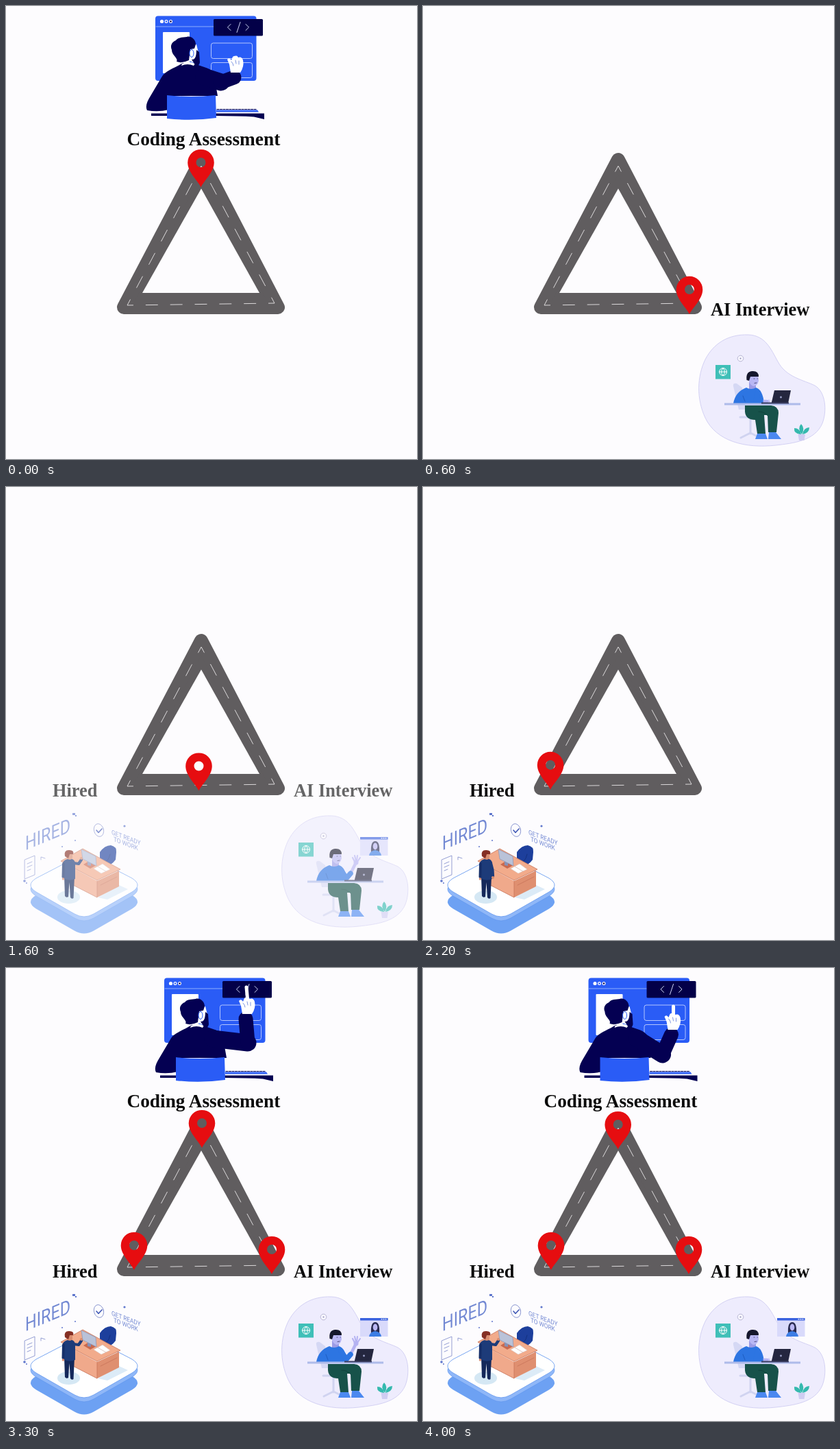
An HTML page that plays this animation: 600 px wide and 660 px high, repeating every 4100 ms.

```html
<!DOCTYPE html>
<html lang="en">
<head>
<meta charset="utf-8">
<title>Hiring road map</title>
<style>
  html, body { margin: 0; width: 100%; height: 100%; overflow: hidden; background: #fdfcfe; }
  svg { display: block; width: 600px; height: 660px; }
  .label { font: bold 26.4px "Liberation Serif", "Times New Roman", serif; fill: #0b0b0b; }
  .iso { font-family: Roboto, sans-serif; fill: #7389d3; }
  .line { fill: none; stroke-linecap: round; stroke-linejoin: round; }
</style>
</head>
<body>
<svg viewBox="0 0 600 660">
  <defs>
    <path id="slab" d="M100 541Q114 533 128 541L184 570Q200 580 184 590L128 622Q114 630 100 622L44 590Q28 580 44 570Z"/>
    <path id="pin" fill="#e60d10" fill-rule="evenodd"
      d="M0 0C-4-9-19.3-22-19.3-35.8A19.3 19.3 0 0 1 19.3-35.8C19.3-22 4-9 0 0ZM-7-36A7 7 0 0 0 7-36A7 7 0 0 0-7-36Z"/>
  </defs>

  <!-- road -->
  <path d="M285 224L397 439H172Z" fill="#605d5f" stroke="#605d5f" stroke-width="20" stroke-linejoin="round"/>
  <path d="M285 266L370 418H199Z" fill="#fdfcfe"/>
  <g class="line" stroke="#e9e7e8" stroke-width=".9" stroke-dasharray="2 2" stroke-dashoffset="1" style="stroke-linecap:butt">
    <path pathLength="24" d="M285 233L392 433"/>
    <path pathLength="24" d="M392 433L177 436"/>
    <path pathLength="24" d="M177 436L285 233"/>
  </g>

  <!-- coding assessment -->
  <g id="coding">
    <g id="coder">
      <rect x="218" y="14.500" width="147.500" height="94.500" rx="4" fill="#2a5cf6"/>
      <path class="line" stroke="#a9c0ff" stroke-width=".8" d="M219 30H365"/>
      <g stroke="#fff" stroke-width="1.200">
        <circle cx="227.500" cy="22.500" r="2" fill="#fff"/>
        <circle cx="234" cy="22.500" r="1.900" fill="#2a5cf6"/>
        <circle cx="240.500" cy="22.500" r="1.900" fill="#040052"/>
      </g>
      <rect x="229" y="38" width="39" height="60" rx="1" fill="#fff"/>
      <g fill="none" stroke="#c3d2ff" stroke-width=".9">
        <rect x="299.500" y="54" width="60" height="22.500" rx="3"/>
        <rect x="299.500" y="82.500" width="60" height="22" rx="3"/>
      </g>
      <rect x="303" y="19" width="72" height="24.500" rx="1.500" fill="#030048"/>
      <path class="line" stroke="#cfd6f5" stroke-width="1" d="M328 26.500L323.500 31L328 35.500M342 23.500L337 38.500M350 26.500L354.500 31L350 35.500"/>
      <path d="M307 151.500H367L369 154.500H307Z" fill="#2a5cf6"/>
      <path class="line" stroke="#040052" stroke-width="1.200" stroke-dasharray="3 1.500" d="M308 150.500H366"/>
      <path d="M212 156.500H377V165L362 161.500Q340 160 306 160H212Z" fill="#040052"/>
      <path d="M206 152C203 146 206 139 211 131L227 104C232 94 246 91 258 83L275 83C284 89 295 88 303 97L309 131H236L238 151Q222 155 206 152Z" fill="#040052"/>
      <path id="sleeve" class="line" stroke="#040052" stroke-width="25"/>
      <path id="forearm" class="line" stroke="#040052" stroke-width="21"/>
      <path d="M257 84Q268 79 276 84L274 87Q265 83 256 87Z" fill="#fff"/>
      <path d="M266 58L278 56L282 72Q282 82 276 83L264 79Z" fill="#fff"/>
      <path d="M242 64C239 57 243 52 248 50C251 45 259 46 264 45C269 43 277 48 277 56L275 62L269 63L267 79Q257 84 249 81C252 76 242 72 242 64Z" fill="#040052"/>
      <path d="M278 64L282 67L283 82Q282 88 277 87L271 78Q278 79 278 64Z" fill="#040052"/>
      <ellipse cx="271" cy="69" rx="3" ry="5.500" fill="#fff" stroke="#2a5cf6"/>
      <path d="M235 130Q270 134 306 130L307 163Q271 168 235 164Z" fill="#2a5cf6"/>
      <g id="hand">
        <path id="finger" class="line" stroke="#fff" stroke-width="5"/>
        <path id="palm" d="M-7 13L-9 1L-12-6Q-9-10-6-5L-4-10Q0-13 4-9Q9-11 11-5Q13 4 7 13Z" fill="#fff"/>
        <path id="creases" class="line" stroke="#5f7bd8" stroke-width=".8" d="M0-5L1 0M5-4L5 1M-6-3Q-3 0-3 3"/>
      </g>
    </g>
    <text class="label" x="176.500" y="203" style="font-size:27.300px">Coding Assessment</text>
  </g>

  <!-- interview -->
  <g id="talk">
    <text class="label" x="420" y="450.500">AI Interview</text>
    <path d="M475 479C500 480 508 500 518 518C530 541 556 545 572 553C588 562 590 590 583 608C572 634 540 637 515 640C470 645 428 634 412 600C399 572 400 540 412 515C424 492 445 478 475 479Z" fill="#eeecfd" stroke="#cbc8f0" stroke-width=".8"/>
    <g id="desk">
      <rect x="427" y="518" width="22" height="20.500" fill="#3fbfb8"/>
      <path class="line" stroke="#fff" d="M432.500 528A5.500 5.500 0 0 0 443.500 528A5.500 5.500 0 0 0 432.500 528ZH443.500M438 522.500Q433 528 438 533.500Q443 528 438 522.500"/>
      <circle cx="463.500" cy="508.500" r="4.300" fill="#f7f6ff" stroke="#aaa9c8" stroke-width=".8"/>
      <circle cx="463.500" cy="508.500" r="1" fill="#8a8ab0"/>
      <path d="M453 549Q452 544 458 545L466 551L472 583H461Z" fill="#d5d8f4"/>
      <path class="line" stroke="#d0d3f0" stroke-width="3" d="M463 594H492M478 595V618M464 624L478 617L492 624"/>
      <path d="M470 577H508Q519 578 519 588L516 616H504L503 591H498L500 618H488L485 598Q471 598 470 586Z" fill="#17524a"/>
      <path class="line" stroke="#0f3e3a" stroke-width=".8" d="M503 592Q499 586 490 586"/>
      <path d="M488 618H500L503 626H485ZM505 616H515L523 626H504Z" fill="#4b88f0"/>
      <path d="M476 543H486V554H476Z" fill="#9c9be6"/>
      <path d="M453 574Q456 557 472 551Q479 555 486 551Q496 554 498 574Z" fill="#2d75e2"/>
      <path class="line" stroke="#1e5cc0" d="M467 563L470 571"/>
      <path d="M474 533Q482 530 489 533L490 541Q488 549 482 549Q475 546 474 533Z" fill="#b9b7f4"/>
      <path d="M472.500 540Q471 528 480 527Q490 526 490 535L478 535L476 541Z" fill="#15172c"/>
      <path class="line" stroke="#34345c" stroke-width=".8" d="M483 538H484M488 538H488.500M484 544.500L487 544"/>
      <path id="wrist" class="line" stroke="#b4b2f2" stroke-width="4.500"/>
      <path id="cuff" class="line" stroke="#2d75e2" stroke-width="7.500"/>
      <g id="wave" class="line" stroke="#b4b2f2" stroke-width="2">
        <path d="M-2-1L-5-7M0-2L-2-10M1-2L2-10M2-1L6-7"/>
        <circle r="3.500" fill="#b4b2f2" stroke="none"/>
      </g>
      <rect x="440" y="573.500" width="111" height="3" fill="#aebbea"/>
      <path d="M513 555H537L533 574H508.500Z" fill="#24263f"/>
      <path d="M494 572.500H534V574.500H494Z" fill="#3b3e62"/>
      <circle cx="522.500" cy="565" r="1.400" fill="#9aa0c8"/>
      <path d="M547.500 619H558L556.500 628H549Z" fill="#cfcdf2"/>
      <path d="M553 619Q546 610 552 604Q558 610 553 619ZM551 619Q541 618 542 610Q550 610 552 619ZM554 619Q556 609 564 609Q564 617 554 619Z" fill="#35b9ae"/>
    </g>
    <g id="popup">
      <rect x="517" y="510" width="40.500" height="27" fill="#d9dafb"/>
      <rect x="517" y="510" width="40.500" height="3.500" fill="#3a62df"/>
      <path class="line" stroke="#fff" stroke-width="1.200" d="M548 511.700H549M551 511.700H552M554 511.700H555"/>
      <path d="M533 532Q532 516 539 516Q546 516 545 532Z" fill="#292b50"/>
      <path d="M530 537Q531 530 539 529Q547 530 548 537Z" fill="#3c7de4"/>
      <ellipse cx="539" cy="523.500" rx="3.300" ry="5" fill="#bab7f3"/>
    </g>
  </g>

  <!-- hired -->
  <g id="hired">
    <text class="label" x="68" y="450.500">Hired</text>
    <use href="#slab" y="24.500" fill="#6da1f3"/>
    <use href="#slab" y="6" fill="#8fb7f8" stroke="#5c93ec" stroke-width=".6"/>
    <use href="#slab" fill="#fff" stroke="#6b9df0" stroke-width=".9"/>
    <text class="iso" font-size="28.500" transform="matrix(.82 -.34 0 1 28 529.500)">HIRED</text>
    <g class="iso" font-size="9.500">
      <text transform="matrix(.87 .33 0 1 154 506)">GET READY</text>
      <text transform="matrix(.87 .33 0 1 157 516)">TO WORK</text>
    </g>
    <g class="line" stroke="#8894cf" stroke-width=".9">
      <ellipse cx="135.500" cy="500" rx="7" ry="9.500" transform="rotate(-15 135.500 500)"/>
      <path d="M132 500L135 503.500L140 498" stroke="#3f57b5" stroke-width="1.600"/>
      <path d="M27.500 543L42 537V565L27.500 571ZM31 549L38 546M31 554L38 551M31 559L36 557M51 543V539L57 541"/>
    </g>
    <g fill="#5f76cc">
      <rect x="97" y="475" width="4" height="3"/>
      <rect x="101" y="478" width="2" height="2"/>
      <circle cx="173" cy="494" r="1.600"/>
      <circle cx="82" cy="524" r="1"/>
      <circle cx="101" cy="515" r="1"/>
      <circle cx="27" cy="574" r="1.800"/>
      <circle cx="30" cy="577" r="1"/>
    </g>
    <path d="M134 598L165 580L178 586L148 601Z" fill="#dcebf7"/>
    <path d="M137 532Q144 522 153 522Q162 524 161 532L160 543Q154 551 148 551L137 545Z" fill="#1d3f9c"/>
    <path d="M140 546Q149 549 152 535" class="line" stroke="#14307e"/>
    <path d="M98 555L133 574V598L98 580Z" fill="#f0a98b"/>
    <path d="M133 574L165 559V582L133 598Z" fill="#df8f70"/>
    <path d="M80 545L112 527L167 557L133 573Z" fill="#f2ab8b" stroke="#c8745a" stroke-width=".8"/>
    <path class="line" stroke="#c8745a" stroke-width=".8" d="M133 574V598L98 580M138 580L162 568"/>
    <path d="M113 550L121 545L132 551L123 556Z" fill="#c8694f"/>
    <path d="M119 544L124 547V552L119 551Z" fill="#8791b5"/>
    <path d="M110 528L131 538L132 552L112 542Z" fill="#b9c2d8" stroke="#8994b6" stroke-width=".7"/>
    <path d="M128 556L141 549L152 557L139 563Z" fill="#fff" stroke="#d9c8c4" stroke-width=".6"/>
    <path class="line" stroke="#c8a49a" stroke-width=".6" d="M134 553L146 560"/>
    <ellipse cx="91.500" cy="597.500" rx="16.500" ry="9.500" fill="#d5e8f4"/>
    <path d="M85 567H100L98.500 599Q96 601 94 598L92.500 576L91 597Q88 599 86 596Z" fill="#14285a"/>
    <path d="M83 547Q86 542 92 542Q99 541 101 547L101 571Q92 575 84 570Z" fill="#1d3b79"/>
    <path class="line" stroke="#17306a" stroke-width="4" d="M84 549L83.500 568"/>
    <circle cx="83.500" cy="571" r="1.800" fill="#d98d70"/>
    <path d="M88 533H97V541Q93 545 89 541Z" fill="#d98d70"/>
    <path d="M86 538Q84 529 92 529Q100 529 98 535L93 535L91 541Z" fill="#852f24"/>
    <path id="arm" class="line" stroke="#1d3b79" stroke-width="4.200"/>
    <circle id="fist" r="2.100" fill="#d98d70"/>
  </g>

  <use id="pinTop" href="#pin"/>
  <use id="pinRight" href="#pin"/>
  <use id="pinLeft" href="#pin"/>
</svg>
<script>
const LOOP = 4100;
const $ = id => document.getElementById(id);
const set = (id, name, value) => $(id).setAttribute(name, value);
const move = (id, x, y) => set(id, "transform", `translate(${x} ${y})`);

// Each track is a list of [time, ...values]; values ease between steps.
const tracks = {
  coding: [[100, 1], [400, 0], [2930, 0], [3200, 1]],
  talk: [[200, 0], [550, 1], [1350, 1], [1950, 0], [2930, 0], [3200, 1]],
  hired: [[1250, 0], [1850, 1]],
  extraPins: [[2930, 0], [3200, 1]],
  popup: [[750, 0], [1000, 1]],
  pin: [[0, 284.5, 264], [550, 389, 449], [1150, 388, 446], [1600, 281.5, 442.5], [2050, 186, 441], [2900, 187, 440]],
  topPin: [[3300, 286, 262], [3900, 284.7, 264]],
  slide: [[0, 0], [400, 5], [2930, 7], [3300, 13], [4100, 24]],
  // elbow, palm, finger tip
  reach: [[0, 314, 111, 335, 84, 336, 75], [2930, 318, 113, 336, 78, 337, 64],
    [3300, 340, 109, 339, 54, 338, 28], [4000, 326, 126, 341, 77, 342, 56]],
  greet: [[1000, 0], [1350, 1], [3300, 1], [3750, 0]],
  bob: [[600, 5], [1000, 0]],
  armUp: [[1700, 1], [2050, 0], [2930, 0], [3200, 1]]
};

function at(name, t) {
  const steps = tracks[name];
  const next = steps.findIndex(s => s[0] > t);
  if (next === 0) return steps[0].slice(1);
  if (next < 0) return steps[steps.length - 1].slice(1);
  const a = steps[next - 1], b = steps[next];
  const k = (t - a[0]) / (b[0] - a[0]), e = k * k * (3 - 2 * k);
  return a.slice(1).map((v, i) => v + (b[i + 1] - v) * e);
}
const mix = (a, b, k) => a + (b - a) * k;

function drawPins(t) {
  const [extra] = at("extraPins", t);
  move("pinLeft", ...at("pin", t));
  move("pinTop", ...at("topPin", t));
  move("pinRight", 388, 446);
  set("pinTop", "opacity", extra);
  set("pinRight", "opacity", extra);
}

function drawCoder(t) {
  const [ex, ey, px, py, fx, fy] = at("reach", t);
  move("coder", at("slide", t)[0], 0);
  set("sleeve", "d", `M289 103L${ex} ${ey}`);
  set("forearm", "d", `M${ex} ${ey}L${px - 2} ${py + 20}`);
  set("finger", "d", `M${px + 1} ${py - 4}L${fx} ${fy}`);
  move("palm", px, py);
  move("creases", px, py);
}

function drawTalk(t) {
  const [up] = at("greet", t);
  const hx = mix(502, 511, up), hy = mix(571, 547, up);
  move("desk", 0, at("bob", t)[0]);
  set("popup", "opacity", at("popup", t)[0]);
  set("cuff", "d", `M489 558L${mix(486, 497, up)} 570L${mix(493, 503, up)} ${mix(571, 563, up)}`);
  set("wrist", "d", `M${mix(493, 503, up)} ${mix(571, 563, up)}L${hx} ${hy}`);
  set("wave", "transform", `translate(${hx} ${hy}) rotate(${mix(90, 0, up)}) scale(${mix(.45, 1, up)})`);
}

function drawHired(t) {
  const [up] = at("armUp", t);
  const x = mix(102, 110, up), y = mix(567, 543, up);
  set("arm", "d", `M99 548L${mix(101.5, 106, up)} ${mix(558, 549, up)}L${x} ${y}`);
  set("fist", "cx", x);
  set("fist", "cy", y + mix(2, -2, up));
}

function draw(now) {
  const t = now % LOOP;
  for (const id of ["coding", "talk", "hired"]) set(id, "opacity", at(id, t)[0]);
  drawPins(t);
  drawCoder(t);
  drawTalk(t);
  drawHired(t);
}

let start;
function tick(now) {
  start ??= now;
  draw(now - start);
  requestAnimationFrame(tick);
}
draw(0);
requestAnimationFrame(tick);
</script>
</body>
</html>
```
